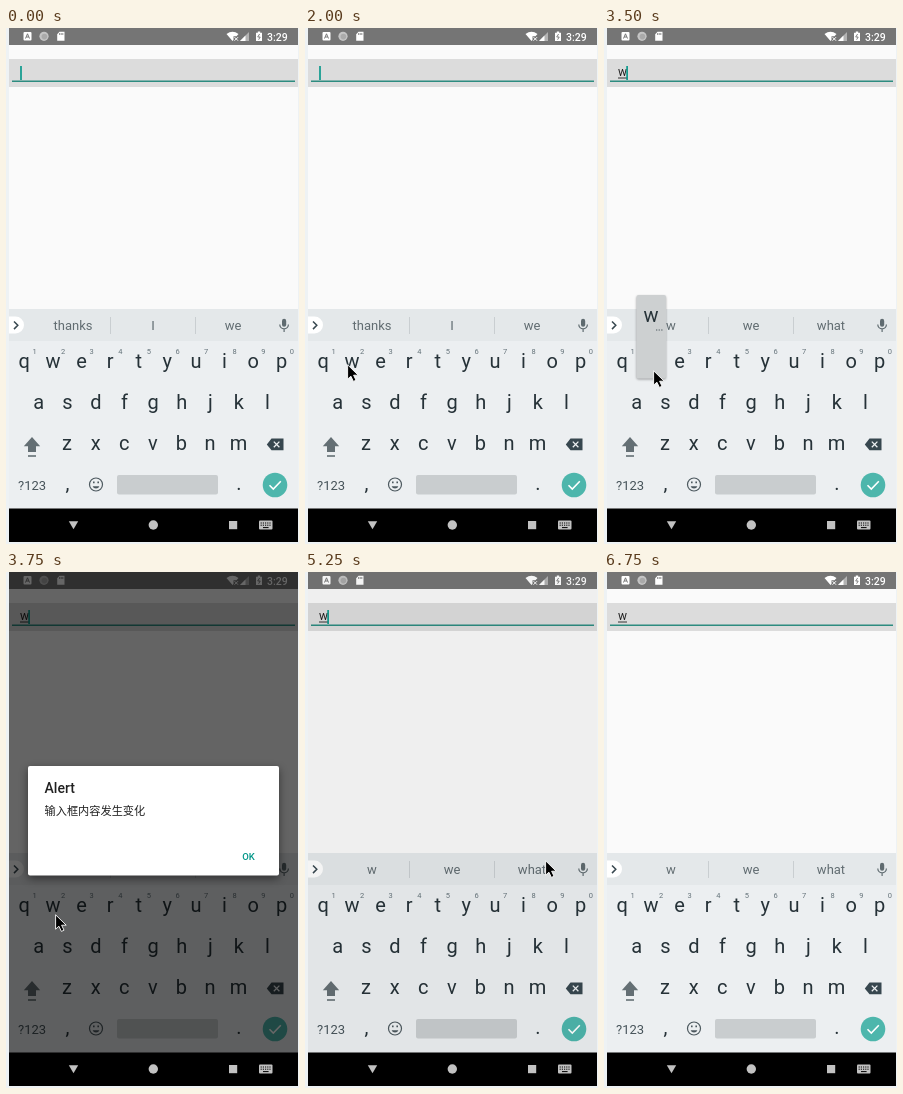
These frames come from a looping animation (293 px wide and 516 px high, 7 s). An HTML page:

```html
<!DOCTYPE html>
<html lang="en">
<head>
<meta charset="utf-8">
<title>Input change alert</title>
<style>
  html, body { margin: 0; width: 100%; height: 100%; overflow: hidden; background: #eef2f4; }
  svg { display: block; width: 293px; height: 516px; font-family: Roboto, "Noto Sans CJK SC", "Noto Sans CJK", sans-serif; }
  .mid { text-anchor: middle; }
  .key { font-size: 20px; fill: #263238; }
  .hint { font-size: 7.5px; fill: #65737a; }
  .word { font-size: 13px; fill: #616c71; }
  .medium { font-weight: 500; }
</style>
</head>
<body>
<svg viewBox="0 0 293 516">
  <!-- app -->
  <rect x="3" width="289" height="514" fill="#fafafa"/>
  <rect x="3" width="289" height="17" fill="#757575"/>
  <rect x="3" y="31" width="289" height="28" fill="#dcdcdc"/>
  <path d="M6 53.3H289" stroke="#2d8c80" stroke-width="1.4"/>
  <g id="typed">
    <text x="14" y="48" font-size="12" fill="#222">w</text>
    <path d="M14 50H23" stroke="#333"/>
  </g>
  <rect id="caret" y="38" width="1.6" height="14" fill="#009688"/>

  <!-- status bar -->
  <g fill="#fff">
    <rect x="17.5" y="4" width="8" height="8.5" rx="1"/>
    <path d="M19.5 10.5L21.5 5.8L23.5 10.5M20.3 9H22.7" fill="none" stroke="#757575"/>
    <circle cx="38" cy="8.3" r="4.6" fill="#c4c4c4"/>
    <circle cx="38.4" cy="8.6" r="2.8" fill="#aaa"/>
    <path d="M53.5 3.8H58.5V12.8H51.2V6.2Z"/>
    <path d="M53.6 5V7M55.2 5V7M56.8 5V7" stroke="#757575" stroke-width=".8"/>
    <path d="M220.5 6Q226.5 1.5 232.5 6L230.5 8.2H227.5V12L226.5 13Z"/>
    <path d="M228.5 9.2L232 12.7M232 9.2L228.5 12.7" stroke="#fff"/>
    <path d="M243 4V13H234Z" opacity=".45"/>
    <path d="M239.5 7.5V13H234Z"/>
    <path d="M250 4.8H251.8V3.6H254.2V4.8H256V13H250Z"/>
    <path d="M253.6 6L251.7 9H254.2L252.6 11.7" fill="none" stroke="#757575" stroke-width=".9"/>
    <text x="261" y="12.6" font-size="10.5" class="medium">3:29</text>
  </g>

  <!-- keyboard -->
  <rect x="3" y="281" width="289" height="200" fill="#eceff1"/>
  <rect x="3" y="281" width="289" height="32" fill="#e4e8ea"/>
  <path d="M104.5 289V306M189.5 289V306" stroke="#c9ced1"/>
  <path d="M3 288.5H9.5A8.5 8.5 0 0 1 9.5 305.5H3Z" fill="#fff"/>
  <path d="M8 293.5L11.8 297.3L8 301.1" fill="none" stroke="#37474f" stroke-width="1.5"/>
  <rect x="276" y="290.8" width="4.2" height="8" rx="2.1" fill="#5f6b70"/>
  <path d="M273.8 296.5A4.3 4.3 0 0 0 282.4 296.5M278.1 300.8V304" fill="none" stroke="#5f6b70" stroke-width="1.2"/>
  <g id="keys"></g>
  <path d="M26 409L34.2 418.3H30V424H22V418.3H17.8Z" fill="#646f74"/>
  <path d="M22 428H30" stroke="#646f74" stroke-width="1.6"/>
  <path d="M265.5 410.5H277.5V422.3H265.5L260.8 416.4Z" fill="#37474f"/>
  <path d="M267.8 413.6L273.4 419.2M273.4 413.6L267.8 419.2" stroke="#eceff1" stroke-width="1.3"/>
  <text x="12" y="462" font-size="13" fill="#465359">?123</text>
  <g fill="none" stroke="#4d595f" stroke-width="1.2">
    <circle cx="90" cy="456.5" r="6.5"/>
    <path d="M86.6 458.2A3.6 3.6 0 0 0 93.4 458.2Z" fill="#4d595f" stroke="none"/>
    <path d="M87 454.4H88.6M91.4 454.4H93" stroke-width="1.7"/>
  </g>
  <rect x="111" y="447" width="101" height="19.5" rx="2" fill="#c9cdcf"/>
  <circle cx="269" cy="457" r="12.3" fill="#4db6ac"/>
  <path d="M263.5 457.2L267.3 461L274.8 453.3" fill="none" stroke="#fff" stroke-width="1.6"/>

  <!-- navigation bar -->
  <rect x="3" y="480.5" width="289" height="33.5"/>
  <g fill="#c2c2c2">
    <path d="M62.8 493.2H72.2L67.5 501.2Z"/>
    <circle cx="147.3" cy="497" r="4.7"/>
    <rect x="223" y="493" width="8.2" height="8.2"/>
    <rect x="253" y="492.6" width="13.5" height="8.8" rx="1"/>
    <path d="M254.6 495H265M254.6 497.2H265" stroke="#000" stroke-dasharray="1.2 1"/>
    <path d="M257 499.6H262.6" stroke="#000"/>
  </g>

  <g id="popup">
    <rect x="32.5" y="267" width="29.5" height="83.5" rx="2" fill="#cdd0d1" style="filter:drop-shadow(0 1px 1px #0005)"/>
    <text x="47" y="294" class="mid key">w</text>
    <path d="M52 302H58.5" stroke="#4d595f" stroke-dasharray="1.3 1.3"/>
  </g>

  <rect id="scrim" x="3" width="289" height="481"/>
  <g id="dialog">
    <rect x="22" y="194" width="251" height="109.5" rx="2" fill="#fff" style="filter:drop-shadow(0 3px 4px #0007)"/>
    <text x="38.5" y="221" font-size="14" class="medium" fill="#212121">Alert</text>
    <text x="38.5" y="242.5" font-size="11.2" fill="#222">输入框内容发生变化</text>
    <text x="242.5" y="288" font-size="9.5" class="mid medium" fill="#009688">OK</text>
  </g>

  <path id="pointer" d="M.6 .8V15.2L3.9 12.2L6.4 17.4L9 16.2L6.6 11.2H11.2Z" stroke="#fff" stroke-width=".9"/>
</svg>
<script>
const el = id => document.getElementById(id);

function label(x, y, text, style) {
  const node = document.createElementNS('http://www.w3.org/2000/svg', 'text');
  node.setAttribute('x', x);
  node.setAttribute('y', y);
  node.setAttribute('class', 'mid ' + style);
  node.textContent = text;
  el('keys').append(node);
  return node;
}

const PITCH = 28.6;
[['qwertyuiop', 18.3, 340], ['asdfghjkl', 32.7, 381], ['zxcvbnm', 61, 422]].forEach(([row, x, y]) =>
  [...row].forEach((char, i) => label(x + i * PITCH, y, char, 'key')));
[...'1234567890'].forEach((char, i) => label(28.5 + i * PITCH, 326, char, 'hint'));
label(61.5, 462, ',', 'key');
label(233, 462, '.', 'key');

const words = [67, 147, 227].map(x => label(x, 302, '', 'word'));

// [time, x, y]: the pointer jumps and holds; no position means hidden
const pointerSteps = [
  [0], [500, 22, 52], [750, 123, 128], [1000, 59, 192], [1250, 59, 294], [1500, 42, 336],
  [2500, 42, 338], [2750, 42, 339], [3000, 46, 342], [3250, 49, 342], [4250, 129, 310],
  [4500, 210, 297], [4750, 235, 290], [5000, 240, 288], [5750, 253, 285], [6000, 282, 335],
  [6250, 204, 117], [6500]
];

function show(id, visible) {
  el(id).style.display = visible ? '' : 'none';
}

function draw(t) {
  const typed = t >= 3500;
  const alertOpen = t >= 3750 && t < 5250;
  const caretOn = typed ? t < 5750 || (t >= 6250 && t < 6750) : t % 1000 < 500;

  show('typed', typed);
  show('caret', caretOn);
  el('caret').setAttribute('x', typed ? 22.3 : 14.2);
  show('popup', typed && t < 3750);
  show('dialog', alertOpen);
  el('scrim').setAttribute('opacity', alertOpen ? 0.6 : t >= 5250 && t < 5500 ? 0.045 : 0);
  (typed ? ['w', 'we', 'what'] : ['thanks', 'I', 'we']).forEach((word, i) => words[i].textContent = word);

  const [, x, y] = pointerSteps.findLast(step => step[0] <= t);
  show('pointer', x !== undefined);
  if (x !== undefined) el('pointer').setAttribute('transform', `translate(${x} ${y})`);
}

const start = performance.now();
function tick() {
  draw((performance.now() - start) % 7000);
  requestAnimationFrame(tick);
}
tick();
</script>
</body>
</html>
```
